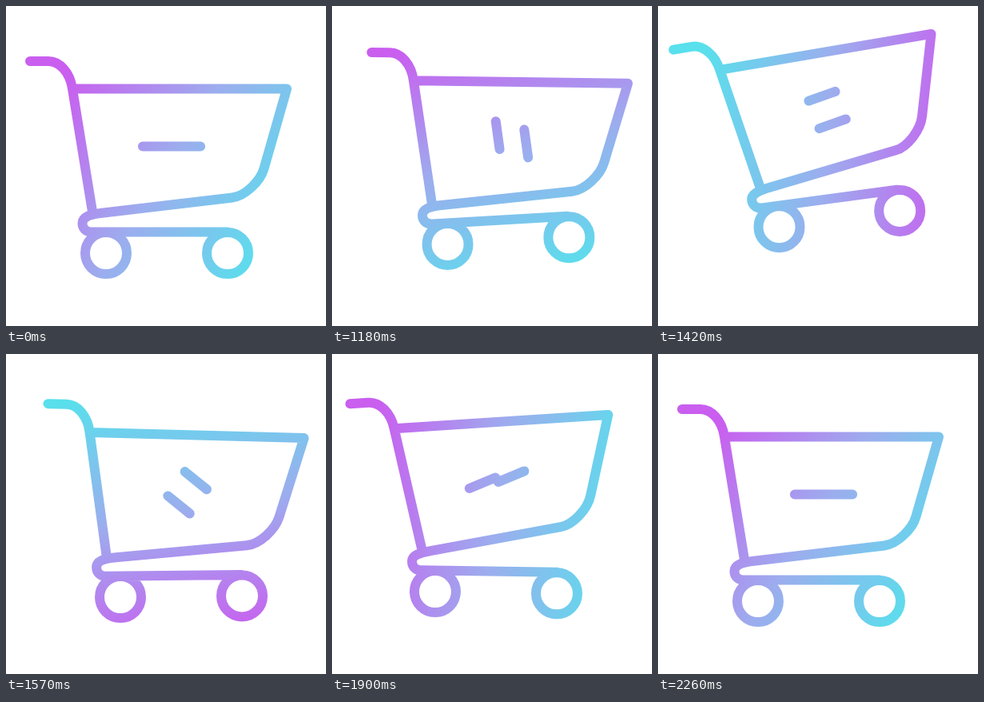
These frames come from a looping animation (400 by 400 pixels, 2290 ms). An HTML page with a canvas:

```html
<!DOCTYPE html>
<html lang="en">
<head>
<meta charset="utf-8">
<title>Cart</title>
<style>
  html, body { margin: 0; width: 100%; height: 100%; overflow: hidden; background: #fff; }
  canvas { display: block; width: 100vmin; height: 100vmin; }
</style>
</head>
<body>
<canvas id="stage"></canvas>
<script>
const LOOP = 2290, START = 1030, TICK = 30;
const canvas = document.getElementById('stage');
const ctx = canvas.getContext('2d');

// time, x, y, chassis tilt, basket flex, pair turn, dash spin, gradient turn
const KEYS = [
  [1000, 0, 0, 0, 0, 0, 0, 0],
  [1030, 0, 0, 0, 3, 0, 12, 2],
  [1090, 4, 0, -0.5, 7, 3, 38, 12],
  [1270, 31, -28, -6.75, -0.3, 34, 122, 78],
  [1360, 29, -38, -9, -2.5, 60, 152, 122],
  [1570, 18, -5, -0.6, 2.1, 123.5, 217.5, 228],
  [1630, 14.5, 0, 0.6, 6, 135, 246, 251],
  [1750, 8, -20, 2.6, -5.2, 154.6, 306.6, 292],
  [1830, 5.5, -16, 1.5, -5.5, 166, 330, 320],
  [2050, 1.5, -4, 0, -0.9, 178, 356, 358],
  [2230, 0, 0, 0, 0, 180, 360, 360]
];
const WHEEL = [125, 309], HINGE = [108, 260], DASHES = [207, 175.5], CENTRE = [200, 205];

const rad = deg => deg * Math.PI / 180;

function rotate([x, y], [cx, cy], deg) {
  const c = Math.cos(rad(deg)), s = Math.sin(rad(deg));
  return [cx + (x - cx) * c - (y - cy) * s, cy + (x - cx) * s + (y - cy) * c];
}

const slope = (i, k) => (KEYS[i + 1][k] - KEYS[i][k]) / (KEYS[i + 1][0] - KEYS[i][0]);

function tangent(i, k) {
  if (i === 0 || i === KEYS.length - 1) return 0;
  const a = slope(i - 1, k), b = slope(i, k);
  return a * b <= 0 ? 0 : 2 * a * b / (a + b);
}

// Monotone cubic through the key poses
function poseAt(time) {
  const last = KEYS.length - 1;
  if (time < START || time >= KEYS[last][0]) return KEYS[0].slice(1);
  let i = 0;
  while (time >= KEYS[i + 1][0]) i++;
  const span = KEYS[i + 1][0] - KEYS[i][0];
  const u = (time - KEYS[i][0]) / span, u2 = u * u, u3 = u2 * u;
  return KEYS[i].slice(1).map((v, n) => {
    const k = n + 1;
    return v * (2 * u3 - 3 * u2 + 1) + KEYS[i + 1][k] * (3 * u2 - 2 * u3)
      + span * (tangent(i, k) * (u3 - 2 * u2 + u) + tangent(i + 1, k) * (u3 - u2));
  });
}

function draw(time) {
  const [dx, dy, tilt, flex, pair, spin, hue] = poseAt(time);
  const chassis = (x, y) => {
    const p = rotate([x, y], WHEEL, tilt);
    return [p[0] + dx, p[1] + dy];
  };
  const basket = (x, y) => chassis(...rotate([x, y], HINGE, flex));
  const move = p => ctx.moveTo(...p);
  const line = p => ctx.lineTo(...p);
  const curve = (a, b, c) => ctx.bezierCurveTo(...a, ...b, ...c);

  const scale = canvas.width / 400;
  ctx.setTransform(scale, 0, 0, scale, 0, 0);
  ctx.clearRect(0, 0, 400, 400);

  const [gx, gy] = chassis(...CENTRE);
  const ax = Math.cos(rad(32 + hue)), ay = Math.sin(rad(32 + hue));
  const paint = ctx.createLinearGradient(gx - 165 * ax, gy - 165 * ay, gx + 165 * ax, gy + 165 * ay);
  paint.addColorStop(0, '#c95eef');
  paint.addColorStop(0.5, '#9cadee');
  paint.addColorStop(1, '#58e0ec');
  ctx.strokeStyle = paint;
  ctx.lineWidth = 12;
  ctx.lineCap = ctx.lineJoin = 'round';

  ctx.beginPath();
  // handle and back post
  move(basket(30, 69));
  line(basket(53, 69));
  curve(basket(67, 69), basket(80, 83), basket(83, 103.5));
  line(basket(108, 257));
  // basket rim, front, floor and lower rail
  move(basket(83, 103.5));
  line(basket(351, 103.5));
  line(basket(322.5, 203));
  curve(basket(318, 219), basket(299, 237.5), basket(283, 239.5));
  line(basket(120, 258.8));
  curve(basket(103, 260.8), chassis(95.5, 264), chassis(95.5, 271.5));
  curve(chassis(95.5, 278), chassis(100, 282.5), chassis(107, 282.5));
  line(chassis(277, 282.5));
  // wheels
  for (const x of [125, 277]) {
    const [cx, cy] = chassis(x, 309);
    ctx.moveTo(cx + 26, cy);
    ctx.arc(cx, cy, 26, 0, 2 * Math.PI);
  }
  // dashes
  for (const side of [-1, 1]) {
    const mid = rotate([DASHES[0] + side * 18.5, DASHES[1]], DASHES, pair);
    const end = half => basket(...rotate([mid[0] + half, mid[1]], mid, spin));
    move(end(-17.6));
    line(end(17.6));
  }
  ctx.stroke();
}

function resize() {
  const size = Math.min(innerWidth, innerHeight) * (window.devicePixelRatio || 1);
  canvas.width = canvas.height = Math.max(1, Math.round(size));
}

function frame() {
  const t = performance.now() % LOOP;
  draw(t < START ? 0 : START + Math.floor((t - START) / TICK) * TICK);
  requestAnimationFrame(frame);
}

addEventListener('resize', resize);
resize();
frame();
</script>
</body>
</html>
```
